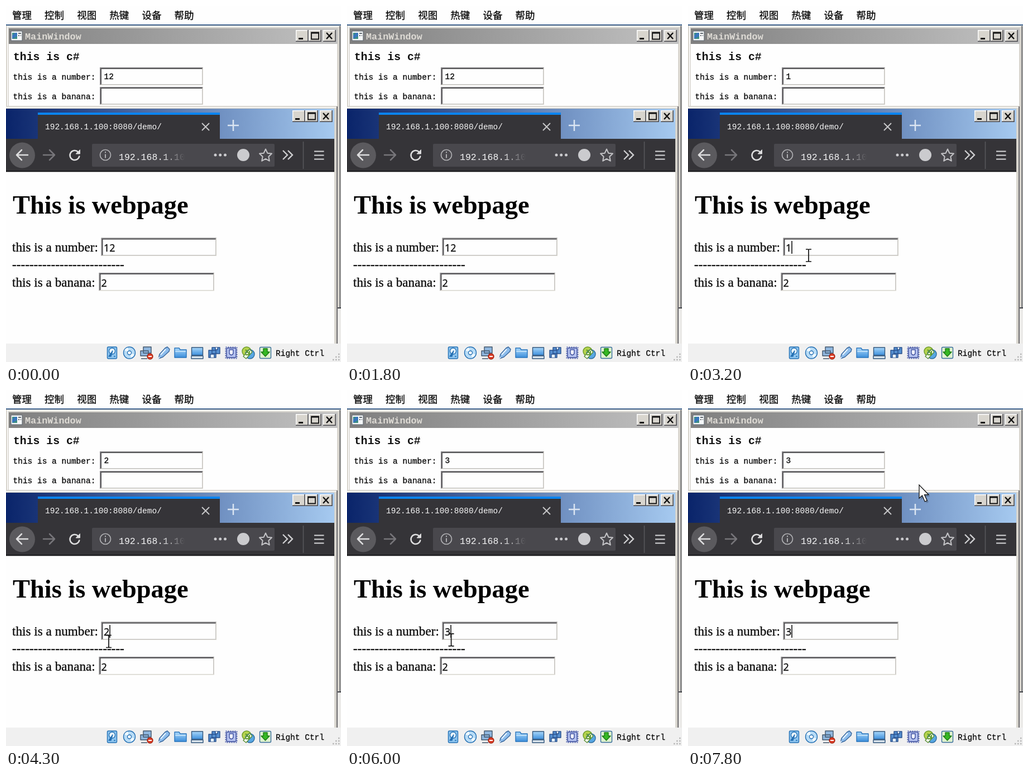
Recreate the animation shown at these times as an HTML page. Size 600 by 638 pixels, loop 7900 ms.

```html
<!DOCTYPE html>
<html lang="en">
<head>
<meta charset="utf-8">
<title>Two-way binding demo</title>
<style>
html, body { margin: 0; width: 100%; height: 100%; overflow: hidden; background: #fefefe; }
svg { display: block; width: 600px; height: 638px; }
text { white-space: pre; }
.cjk { font: 17.5px "Noto Sans CJK SC", "Noto Sans CJK", sans-serif; }
.mono { font: 14.5px "Liberation Mono", monospace; }
.serif { font: 23.2px "Liberation Serif", serif; }
.field { font: 18px "Open Sans", "Noto Sans", sans-serif; }
.ink { color: #0a0a0a; fill: currentColor; stroke: currentColor; stroke-width: .3px; }
</style>
</head>
<body>
<svg id="stage" viewBox="0 0 600 638" xmlns="http://www.w3.org/2000/svg">
  <defs>
    <linearGradient id="gray"><stop stop-color="#7f7f7f"/><stop offset="1" stop-color="#c2c2c2"/></linearGradient>
    <linearGradient id="blue"><stop stop-color="#0a246a"/><stop offset="1" stop-color="#a6caf0"/></linearGradient>
    <linearGradient id="fade" gradientUnits="userSpaceOnUse" x1="278" x2="320"><stop stop-color="#f4f4f5"/><stop offset="1" stop-color="#f4f4f5" stop-opacity="0"/></linearGradient>
    <linearGradient id="sky" x2="0" y2="1"><stop stop-color="#a9d8fb"/><stop offset="1" stop-color="#3c8edb"/></linearGradient>
  </defs>
  <rect width="600" height="638" fill="#fefefe"/>
  <g id="menu" class="cjk ink"></g>

  <!-- desktop window -->
  <rect y="33" width="600" height="572" fill="#d8d5ce"/>
  <rect y="33" width="600" height="2" fill="#40648f"/>
  <rect x="2" y="36" width="594" height="1.5" fill="#fff"/>
  <rect x="2" y="36" width="1.5" height="144" fill="#fff"/>
  <rect x="5" y="40" width="589" height="28" fill="url(#gray)"/>
  <rect x="5" y="68" width="588" height="113" fill="#fefefe"/>
  <rect x="597.5" y="36" width="1.5" height="506" fill="#55585f"/>
  <rect x="594" y="540" width="6" height="2" fill="#45484f"/>
  <rect x="594" y="543" width="6" height="62" fill="#ecebe9"/>
  <g>
    <rect x="9" y="45" width="20" height="17" fill="#f5f7f8" stroke="#5c6670"/>
    <rect x="11" y="48" width="9" height="11" fill="#3d8f83"/>
    <path d="M11 53l5-5h4v6l-9 5z" fill="#3977bc"/>
    <path d="M22 49h5M22 53h2M26 53h1" stroke="#606870" stroke-width="2"/>
  </g>
  <text class="mono" x="34" y="59.5" style="font-size:16.8px;font-weight:bold" fill="#dedbd5">MainWindow</text>
  <text class="mono" x="13" y="97" style="font-size:19.8px;font-weight:bold" fill="#111">this is c#</text>
  <g class="mono ink">
    <text x="12.5" y="132">this is a number:</text>
    <text x="12.5" y="167">this is a banana:</text>
  </g>
  <g id="inputs"></g>

  <!-- browser window -->
  <rect y="179" width="594" height="426" fill="#d8d5ce"/>
  <rect y="181" width="592" height="1.5" fill="#fff"/>
  <rect x="592.2" y="180" width="1.6" height="425" fill="#55555a"/>
  <rect y="184" width="588" height="54" fill="url(#blue)"/>
  <rect x="57" y="191" width="326" height="48" fill="#353438"/>
  <rect x="57" y="191" width="326" height="4" fill="#0a84f0"/>
  <rect y="238" width="588" height="59" fill="#353438"/>
  <rect y="295.5" width="588" height="2" fill="#111114"/>
  <rect x="0" y="297.5" width="588" height="307.5" fill="#fefefe"/>
  <text class="mono" x="70" y="221" fill="#f6f6f6">192.168.1.100:8080/demo/</text>
  <path d="M351 210l13 13m0-13l-13 13" stroke="#c6c6c8" stroke-width="2"/>
  <path d="M397 214h20M407 204v20" stroke="#dbe5f2" stroke-width="2.5"/>
  <circle cx="29" cy="267.5" r="23" fill="#5b5a5e"/>
  <g fill="none" stroke="#dededf" stroke-width="2.5" stroke-linecap="round" stroke-linejoin="round">
    <path d="M39 267H19m9-9l-9 9 9 9"/>
    <path d="M67 267h20m-9-9l9 9-9 9" stroke="#77767a"/>
    <path d="M129 261.5a8.5 8.5 0 1 0 2.300 8"/>
    <path d="M132.500 258v7h-7z" fill="#dededf" stroke-width="1"/>
  </g>
  <rect x="154" y="247" width="327" height="41" rx="2" fill="#49484d"/>
  <circle cx="178" cy="267" r="9.5" fill="none" stroke="#b0b0b3" stroke-width="1.7"/>
  <path d="M178 265.5v7M178 261v2.2" stroke="#b0b0b3" stroke-width="2"/>
  <text class="mono" x="202" y="275.5" style="font-size:16.5px" fill="url(#fade)">192.168.1.10</text>
  <g fill="#cbcbce">
    <circle cx="375" cy="267" r="2.5"/><circle cx="383.7" cy="267" r="2.5"/><circle cx="392.5" cy="267" r="2.5"/>
    <circle cx="425" cy="267" r="11"/>
  </g>
  <path d="M465 256.5l3.3 7.2 7.7.9-5.7 5.3 1.5 7.8-6.8-3.8-6.8 3.8 1.5-7.8-5.7-5.3 7.7-.9z" fill="none" stroke="#c4c4c7" stroke-width="2" stroke-linejoin="round"/>
  <path d="M496 259l8 8-8 8m9-16l8 8-8 8" fill="none" stroke="#d0d0d2" stroke-width="2.3"/>
  <path d="M532.5 243v49" stroke="#59585c" stroke-width="1.5"/>
  <path d="M552 260.5h17.5M552 267.5h17.5M552 274.5h17.5" stroke="#d8d8da" stroke-width="2.2"/>
  <g id="buttons"></g>

  <text class="serif" x="12" y="372" style="font-size:46.4px;font-weight:bold">This is webpage</text>
  <g class="serif ink">
    <text x="11" y="440">this is a number:</text>
    <text x="11" y="471">--------------------------</text>
    <text x="11" y="502.5">this is a banana:</text>
  </g>
  <g id="webInputs"></g>
  <text class="mono ink" id="deskVal" x="175.5" y="130.5"></text>
  <rect id="sel" x="175" y="420" height="25" fill="#0a246a"/>
  <text class="field ink" id="webVal" x="175" y="440"></text>
  <rect id="caret" y="421" width="1.5" height="23"/>
  <text class="field ink" x="170.5" y="502.5">2</text>

  <!-- status bar -->
  <rect y="605" width="600" height="33" fill="#f0f0f0"/>
  <g stroke-width="1.4" stroke-linejoin="round">
    <g stroke="#2671b4">
      <rect x="181.5" y="611" width="17" height="21" rx="2" fill="#8dc4ef"/>
      <circle cx="190" cy="618.5" r="5.5" fill="#e9f5fd"/>
      <path d="M191 618l-7 10h4zM193 628h3" fill="#2671b4"/>
      <circle cx="221" cy="621.5" r="10.5" fill="#b8dcf6"/>
      <path d="M221 621l-9-4a10 10 0 0 1 6-5zM221 621l9 4a10 10 0 0 1-6 5z" fill="#eff8fe" stroke="none"/>
      <circle cx="221" cy="621.5" r="3.5" fill="#fff"/>
    </g>
    <g stroke="#42566b">
      <path d="M246 611h14v11h-14zM241 618h14v9h-14zM242 632h11" fill="#8fb6de"/>
      <circle cx="258" cy="628" r="5" fill="#db3c25" stroke="#a82a18"/>
      <path d="M255 628h6" stroke="#fff" stroke-width="2"/>
    </g>
    <path d="M273 632l2-8 10-11 4-2 4 4-1 4-11 10z" fill="#8cbcec" stroke="#3a689d"/>
    <path d="M277 625l9-10M272 633l3-4" stroke="#e8f4ff" stroke-width="2"/>
    <path d="M302 630v-17h8l2 3h11v14z" fill="url(#sky)" stroke="#2a74bb"/>
    <path d="M303 619h19" stroke="#d6edfd"/>
    <rect x="332.5" y="612" width="20" height="14" fill="url(#sky)" stroke="#31557c"/>
    <path d="M332 627h21v5h-21z" fill="#dce6ee" stroke="#31557c"/>
    <path d="M369 612h14v11h-14zM363 617h13v13h-13z" fill="#558fd0" stroke="#29508c"/>
    <path d="M366 630v-6h7v6M375 612v4h4v-4" fill="#e6f1fb" stroke="#29508c"/>
    <rect x="393.5" y="611.5" width="20" height="20" fill="none" stroke="#4c5fae" stroke-width="2" stroke-dasharray="2 2"/>
    <rect x="395" y="613" width="17" height="17" rx="2" fill="#b5c2ef" stroke="#3b4d9d"/>
    <path d="M400 616v7q3.5 5 7 0v-7z" fill="#eef1fd" stroke="#3b4d9d"/>
    <circle cx="431" cy="619" r="8" fill="#b6d34e" stroke="#6a9a2a"/>
    <circle cx="437" cy="624" r="8" fill="#58a7e3" stroke="#2c6b9f"/>
    <path d="M425 628l11-13 5 5-11 12z" fill="#f4f9ee" stroke="#5b8f35"/>
    <path d="M429 616l7 8m0-6v7h-7" fill="none" stroke="#5f9a2c" stroke-width="2"/>
    <rect x="454.5" y="611.5" width="20" height="20" rx="2" fill="#dff2cf" stroke="#396d9c"/>
    <path d="M461 614h7v6h4l-7.5 8-7.5-8h4z" fill="#36b824" stroke="#197b12"/>
  </g>
  <text class="mono ink" x="483" y="627">Right Ctrl</text>
  <path d="M595 624h3M590 629h8M585 634h13" stroke="#b5b5b5" stroke-width="2.5" stroke-dasharray="2.5 2.5"/>

  <g id="beam" fill="none">
    <path d="M-5-11h3.5q1.5 0 1.5 2 0-2 1.5-2H5M0-9V9M-5 11h3.5q1.5 0 1.5-2 0 2 1.5 2H5" stroke="#111" stroke-width="1.7"/>
  </g>
  <g id="arrow">
    <path d="M3 3V27l5.5-5 4.5 11 4-2-4.5-10h7z" fill="#000" opacity=".18"/>
    <path d="M0 0V24l5.5-5 4.7 11 4-1.7-4.7-10.6h7.5z" fill="#fff" stroke="#111" stroke-width="1.3"/>
  </g>
</svg>
<script>
const $ = id => document.getElementById(id);
const LOOP = 7900;

$('menu').innerHTML = ['管理', '控制', '视图', '热键', '设备', '帮助']
  .map((s, i) => `<text x="${11 + i * 58.1}" y="23">${s}</text>`).join('');

const sunken = (x, y, w, h) => `<rect x="${x}" y="${y}" width="${w}" height="${h}" fill="#d8d5ce"/>
  <path d="M${x} ${y + h}V${y}H${x + w}l-2 2H${x + 2}V${y + h - 2}z" fill="#8a898c"/>
  <rect x="${x + 1.5}" y="${y + 1.5}" width="${w - 3}" height="${h - 3}" fill="#4b4a4d"/>
  <rect x="${x + 3}" y="${y + 3}" width="${w - 4.5}" height="${h - 4.5}" fill="#fefefe"/>`;
$('inputs').innerHTML = sunken(168, 110, 185, 32) + sunken(168, 145, 185, 32);
$('webInputs').innerHTML = sunken(170.5, 415.5, 206.5, 32.5) + sunken(166.5, 478, 206.5, 32.5);

const glyphs = [
  '<path d="M5 15.5h8" stroke-width="3"/>',
  '<path d="M5 4.5h13v12H5zM5 5.5h13" stroke-width="1.8"/>',
  '<path d="M6 5l10 11M16 5L6 16" stroke-width="2.4"/>'
];
const winButtons = (x, y) => glyphs.map((g, i) =>
  `<g transform="translate(${x + [0, 23, 49][i]} ${y})" fill="none" stroke="#111">
    <rect width="22.5" height="21" fill="#d8d5ce" stroke="none"/>
    <path d="M.7 20V.7H22" stroke="#fff" stroke-width="1.4"/>
    <path d="M0 20.3H22V0" stroke="#44444a" stroke-width="1.5"/>${g}</g>`).join('');
$('buttons').innerHTML = winButtons(519, 43) + winButtons(513, 187);

// pointer stops: time, x, y
const path = [
  [2200, 470, 330], [2700, 216, 447], [3500, 216, 447], [3900, 181, 451],
  [4700, 187, 450], [5000, 189, 450], [5200, 181, 451], [5900, 181, 451],
  [6500, 257, 408], [7000, 257, 408], [7600, 414, 170], [LOOP, 414, 170]
];
// edits: time, value
const edits = [[0, '12'], [2900, '1'], [4300, '2'], [5600, '3']];
// selections: start, fully selected, end
const picks = [[3700, 3900, 4300], [5000, 5200, 5600]];

const clamp = v => Math.max(0, Math.min(1, v));
const ease = v => v * v * (3 - 2 * v);

function pointer(t) {
  const i = path.findIndex(p => p[0] > t);
  if (i < 1) return null;
  const [t0, x0, y0] = path[i - 1], [t1, x1, y1] = path[i];
  const k = ease((t - t0) / (t1 - t0));
  return [x0 + (x1 - x0) * k, y0 + (y1 - y0) * k];
}

function place(el, pos, on) {
  el.style.display = pos && on ? '' : 'none';
  if (pos) el.setAttribute('transform', `translate(${pos[0]} ${pos[1]})`);
}

function draw(t) {
  const [since, value] = edits.filter(e => e[0] <= t).pop();
  $('deskVal').textContent = $('webVal').textContent = value;

  const pick = picks.find(p => t >= p[0] && t < p[2]);
  const amount = pick ? clamp((t - pick[0]) / (pick[1] - pick[0])) : 0;
  $('sel').setAttribute('width', 10.5 * amount);
  $('webVal').style.color = amount > .5 ? '#fff' : '';

  const blink = since > 0 && !pick && (t - since) % 1000 < 500;
  $('caret').style.display = blink ? '' : 'none';
  $('caret').setAttribute('x', 175 + value.length * 10.3);

  const pos = pointer(t);
  const inField = pos && pos[0] > 168 && pos[0] < 240 && pos[1] > 415;
  place($('beam'), pos, inField);
  place($('arrow'), pos, !inField);
}

function tick() {
  draw(Math.floor(performance.now() % LOOP / 100) * 100);
  requestAnimationFrame(tick);
}
tick();
</script>
</body>
</html>
```
